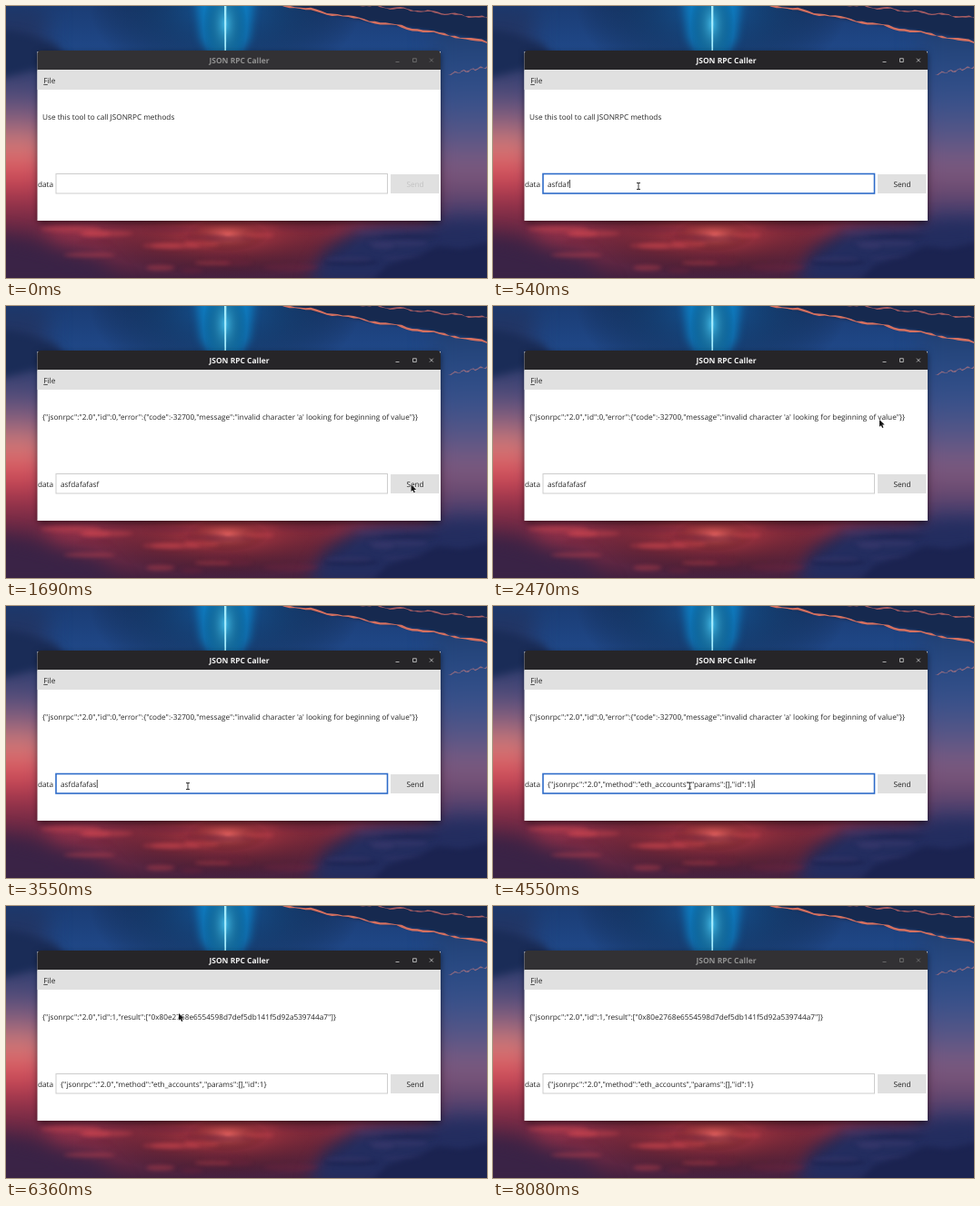
Animation, 529 px wide and 299 px high, one loop 8.14 s. Source, as an HTML page with a canvas:

```html
<!DOCTYPE html>
<html lang="en">
<head>
<meta charset="utf-8">
<title>JSON RPC Caller</title>
<style>
html, body { margin: 0; width: 100%; height: 100%; overflow: hidden; background: #1c3150; }
canvas { display: block; }
</style>
</head>
<body>
<canvas id="stage" width="529" height="299"></canvas>
<script>
const W = 529, H = 299, LOOP = 8140;
const ctx = document.getElementById('stage').getContext('2d');
const FONT = '"Open Sans", "Noto Sans", sans-serif';

const HINT = 'Use this tool to call JSONRPC methods';
const TYPED = 'asfdafafasf';
const REQUEST = '{"jsonrpc":"2.0","method":"eth_accounts","params":[],"id":1}';
const ERROR = '{"jsonrpc":"2.0","id":0,"error":{"code":-32700,"message":"invalid character \'a\' looking for beginning of value"}}';
const RESULT = '{"jsonrpc":"2.0","id":1,"result":["0x80e2768e6554598d7def5db141f5d92a539744a7"]}';

// Pointer path: time, x, y
const PATH = [
  [60, 157, 203], [150, 160, 198], [660, 160, 198], [1000, 446, 198], [1630, 446, 198],
  [2300, 425, 125], [2470, 425, 125], [3250, 200, 198], [4430, 200, 198], [5200, 446, 193],
  [5640, 446, 193], [6060, 330, 135], [6360, 190, 118], [6480, 140, 119], [6900, 240, 235], [7020, 250, 302]
];

const clamp = (v, lo, hi) => Math.min(hi, Math.max(lo, v));

function randomFrom(seed) {
  return () => (seed = (seed * 16807) % 2147483647) / 2147483647;
}

function paintWallpaper() {
  const canvas = document.createElement('canvas');
  canvas.width = W;
  canvas.height = H;
  const g = canvas.getContext('2d');
  const random = randomFrom(71);

  function band(x, w, stops) {
    const gradient = g.createLinearGradient(0, 0, 0, H);
    stops.forEach(([at, color]) => gradient.addColorStop(at / H, color));
    g.fillStyle = gradient;
    g.fillRect(x, 0, w, H);
  }
  function glow(x, y, r, color, squash = 1) {
    g.save();
    g.translate(x, y);
    g.scale(1, squash);
    const gradient = g.createRadialGradient(0, 0, 0, 0, 0, r);
    gradient.addColorStop(0, color);
    gradient.addColorStop(1, 'transparent');
    g.fillStyle = gradient;
    g.fillRect(-r, -r, 2 * r, 2 * r);
    g.restore();
  }
  function shape(color, blur, points) {
    g.filter = blur ? `blur(${blur}px)` : 'none';
    g.fillStyle = color;
    g.beginPath();
    points.forEach(([x, y]) => g.lineTo(x, y));
    g.fill();
    g.filter = 'none';
  }
  function streaks(count, x, y, w, h, length, colors) {
    g.filter = 'blur(2px)';
    for (let i = 0; i < count; i++) {
      g.fillStyle = colors[i % colors.length];
      g.beginPath();
      g.ellipse(x + random() * w, y + random() * h, length * (0.5 + random()), 1.5 + random() * 3, 0, 0, 7);
      g.fill();
    }
    g.filter = 'none';
  }
  // Ragged strip along a line, for lit cloud edges
  function edge(x1, y1, x2, y2, width, color) {
    const top = [], bottom = [];
    for (let i = 0; i <= 40; i++) {
      const x = x1 + (x2 - x1) * i / 40, y = y1 + (y2 - y1) * i / 40 + Math.sin(i * 0.8);
      top.push([x, y - width * random()]);
      bottom.unshift([x, y + width * random()]);
    }
    shape(color, 0.5, top.concat(bottom));
  }

  // Sky: sunset on the left, dusk on the right
  band(0, W, [[0, '#1b3d75'], [55, '#20498a'], [225, '#7c2b48'], [250, '#8e3048'], [299, '#45213f']]);
  g.filter = 'blur(12px)';
  band(-40, 85, [[0, '#1d3362'], [60, '#2a3968'], [95, '#4b4a7a'], [125, '#8a617e'], [155, '#d77c77'], [185, '#d54e5a'], [220, '#8f3048'], [260, '#4f2342'], [299, '#33203f']]);
  band(470, 110, [[0, '#1b3868'], [60, '#274880'], [100, '#35508a'], [140, '#555687'], [175, '#7d5b80'], [205, '#6d4a70'], [235, '#34376a'], [299, '#1d2450']]);
  g.filter = 'none';

  // Light beam
  glow(241, 0, 150, 'rgba(20,105,180,.8)', 0.6);
  shape('rgba(12,135,205,.75)', 5, [[208, -20], [274, -20], [268, 36], [255, 58], [227, 58], [214, 36]]);
  glow(241, 20, 24, 'rgba(80,205,245,.75)', 2);
  shape('#a5ecfd', 0.4, [[240, -3], [242.4, -3], [242, 52], [240.4, 52]]);

  // Upper clouds
  shape('#1a2c57', 4, [[-9, 24], [22, 30], [55, 42], [70, 60], [-9, 80]]);
  shape('#16294f', 1.5, [[300, -5], [540, -5], [540, 40], [460, 26], [400, 17], [345, 7]]);
  edge(300, -2, 535, 41, 1.8, '#d5705f');
  edge(385, -2, 535, 14, 1.4, '#a65c62');
  edge(486, 75, 535, 66, 1.2, '#8f6a80');

  // Lower clouds around the glowing water
  shape('#232d5f', 9, [[335, 300], [350, 268], [385, 246], [420, 240], [540, 236], [540, 310], [335, 310]]);
  shape('#3a2346', 10, [[-20, 250], [40, 262], [100, 278], [130, 310], [-20, 310]]);
  glow(243, 250, 150, 'rgba(225,70,78,.85)', 0.32);
  glow(243, 252, 45, 'rgba(255,125,110,.65)', 0.4);
  streaks(20, 60, 242, 270, 50, 24, ['rgba(110,35,60,.4)', 'rgba(220,75,82,.35)']);
  streaks(12, 370, 248, 160, 45, 24, ['rgba(26,33,78,.6)', 'rgba(66,60,112,.4)']);
  shape('#1b2350', 3, [[395, 310], [420, 284], [450, 276], [475, 264], [500, 268], [540, 258], [540, 310]]);
  return canvas;
}

const wallpaper = paintWallpaper();

function rect(x, y, w, h, color) {
  ctx.fillStyle = color;
  ctx.fillRect(x, y, w, h);
}

function text(value, x, y, { color = '#262626', size = 8.22, weight = 400, align = 'left' } = {}) {
  ctx.font = `${weight} ${size}px ${FONT}`;
  ctx.fillStyle = color;
  ctx.textAlign = align;
  ctx.fillText(value, x, y);
}

function inputValue(t) {
  if (t < 3490) return TYPED.slice(0, clamp(Math.floor((t - 200) / 50), 0, 11));
  if (t < 3870) return TYPED.slice(0, 10);
  if (t < 4430) return TYPED.slice(0, Math.max(0, 8 - 2 * Math.floor((t - 3870) / 60)));
  return REQUEST;
}

function pointerAt(t) {
  const next = PATH.findIndex(key => key[0] > t);
  if (next < 1) return null;
  const [t1, x1, y1] = PATH[next - 1], [t2, x2, y2] = PATH[next];
  const p = (t - t1) / (t2 - t1), e = p * p * (3 - 2 * p);
  return [x1 + (x2 - x1) * e, y1 + (y2 - y1) * e];
}

function drawPointer([x, y]) {
  ctx.save();
  ctx.translate(x, y);
  ctx.lineJoin = 'round';
  if (x > 55 && x < 420 && y > 184 && y < 206) {
    ctx.strokeStyle = '#222';
    ctx.lineWidth = 0.9;
    ctx.stroke(new Path2D('M-2-3.5H2M0-3.5V3.5M-2 3.5H2'));
  } else {
    const arrow = new Path2D('M0 0V7.8L1.8 6.2 3.1 9 4.4 8.4 3.2 5.6H5.7Z');
    ctx.strokeStyle = '#fff';
    ctx.lineWidth = 1;
    ctx.stroke(arrow);
    ctx.fillStyle = '#151515';
    ctx.fill(arrow);
  }
  ctx.restore();
}

function drawWindow(t) {
  const active = t >= 60 && t < 8020;
  const focused = (t >= 100 && t < 1200) || (t >= 3310 && t < 5520);
  const value = inputValue(t);

  ctx.shadowColor = 'rgba(0,0,0,.6)';
  ctx.shadowBlur = 7;
  ctx.shadowOffsetY = 2;
  rect(34.5, 50, 443.5, 186, '#fff');
  ctx.shadowColor = 'transparent';

  ctx.fillStyle = active ? '#262528' : '#323134';
  ctx.beginPath();
  ctx.roundRect(34.5, 49, 443.5, 22, [4, 4, 0, 0]);
  ctx.fill();
  const ink = active ? '#f4f4f4' : '#929292';
  text('JSON RPC Caller', 256.5, 63, { color: ink, size: 8.45, weight: 700, align: 'center' });
  ctx.strokeStyle = active ? '#d0d0d0' : '#777';
  ctx.lineWidth = 0.8;
  ctx.stroke(new Path2D('M428.5 61.5h4M447.5 57.7h3.8v3.8h-3.8zM466 57.7l3.8 3.8M469.8 57.7l-3.8 3.8'));

  rect(34.5, 70, 443.5, 22, '#e0e0e0');
  text('File', 41.3, 84.5);
  rect(41.3, 86, 4.5, 0.8, '#333');

  const message = t < 1440 ? HINT : t < 5700 ? ERROR : RESULT;
  text(message, 40, 125);
  text('data', 35, 198.5);

  ctx.lineWidth = focused ? 1.6 : 1;
  ctx.strokeStyle = focused ? '#2d6bc9' : '#cdcdcd';
  ctx.strokeRect(55, 184.5, 364.5, 21.5);
  text(value, 60, 198.5);
  if (focused) rect(60.3 + ctx.measureText(value).width, 191, 0.8, 9, '#222');

  rect(423, 185, 53.5, 21, '#e0e0e0');
  text('Send', 450, 198.5, { color: value ? '#262626' : '#c2c2c2', align: 'center' });
}

function frame(now) {
  const t = now % LOOP;
  ctx.drawImage(wallpaper, 0, 0);
  ctx.textRendering = 'geometricPrecision';
  drawWindow(t);
  const pointer = pointerAt(t);
  if (pointer) drawPointer(pointer);
  requestAnimationFrame(() => frame(performance.now() - start));
}

const start = performance.now();
frame(0);
</script>
</body>
</html>
```
